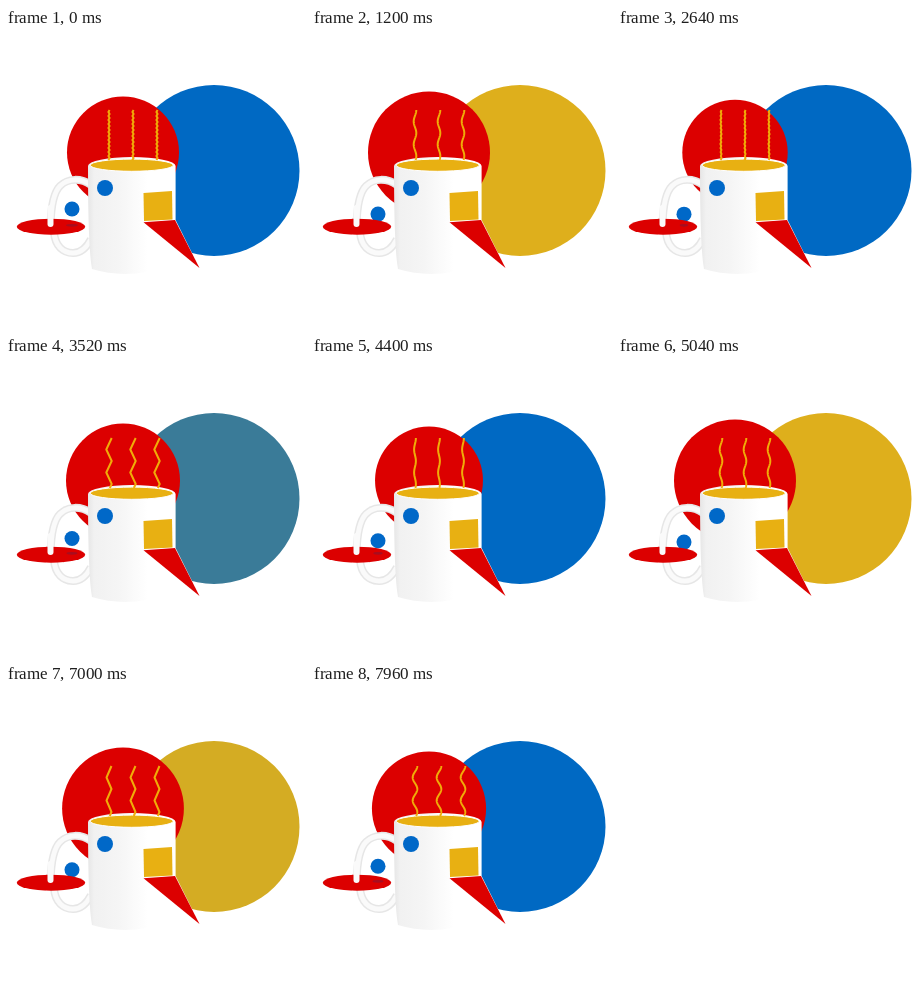
Animation, 300 px wide and 300 px high, one loop 8000 ms. Source, as an HTML page:

```html
<!DOCTYPE html>
<html lang="en">
<head>
<meta charset="utf-8">
<title>Steaming mug</title>
<style>
  html, body { margin: 0; width: 100%; height: 100%; overflow: hidden; background: #fff; }
  svg { display: block; width: 100vw; height: 100vh; }
</style>
</head>
<body>
<svg viewBox="0 0 300 300">
  <defs>
    <linearGradient id="glaze" gradientUnits="userSpaceOnUse" x1="82" x2="142">
      <stop offset="0" stop-color="#e6e6e6"/>
      <stop offset=".1" stop-color="#f1f1f1"/>
      <stop offset=".5" stop-color="#f5f5f5"/>
      <stop offset="1" stop-color="#fff"/>
    </linearGradient>
    <path id="tube" d="M85 157C75 150 62 150 54 158C47 165 45 180 44.500 197M48 204C49 218 57 225 67 225C75 225 81 219 85 211"/>
  </defs>

  <circle id="disc" cx="208" cy="142.5" r="85.5"/>
  <circle id="pulse" cx="117" cy="124.5" fill="#dc0000"/>

  <!-- handle, saucer and bouncing dot -->
  <g fill="none">
    <use href="#tube" stroke="#e6e6e6" stroke-width="8"/>
    <use href="#tube" stroke="#fafafa" stroke-width="5"/>
  </g>
  <circle id="dot" cx="66" r="7.5" fill="#0068c8"/>
  <ellipse cx="45" cy="198.7" rx="34.2" ry="8" fill="#dc0000"/>
  <ellipse id="shade" cx="66" cy="197.3" ry="1.4" fill="#8c1430" opacity=".65"/>
  <path d="M44.5 196V180" stroke="#fafafa" stroke-width="6" stroke-linecap="round"/>

  <!-- mug -->
  <path d="M82 138A43.800 9 0 0 1 169.600 138V192L193 239L141 205V244Q112 249 86 241Q82 220 82 138Z" fill="url(#glaze)"/>
  <ellipse cx="125.700" cy="137.200" rx="41.500" ry="6.100" fill="#e8b012" stroke="#fff"/>
  <circle cx="99" cy="160" r="8" fill="#0068c8"/>
  <path d="M137.500 165L166 163L166.500 191.500L138 193Z" fill="#e8b012"/>
  <path d="M137.500 194.300L169 192L193.500 240Z" fill="#dc0000"/>

  <g fill="none" stroke="#f0ac08" stroke-width="2" stroke-linejoin="round">
    <path class="steam"/>
    <path class="steam" transform="translate(24)"/>
    <path class="steam" transform="translate(48)"/>
  </g>
</svg>
<script>
const LOOP = 8000, BEAT = 1920;
const BLUE = [0, 105, 195], YELLOW = [232, 178, 20];
const WAVE_LENGTH = 23;

// [time, value] pairs, eased between neighbours
const radiusKeys = [[0, 56], [280, 57.1], [720, 52.7], [1200, 61], [1600, 57], [1800, 55.9], [1920, 56]];
const tintKeys = [[0, 0], [880, 0], [1100, 1], [1850, 0], [1920, 0]];
const steamKeys = [[0, 0], [280, 2.3], [720, 0.3], [1200, 1.3], [1600, 1.5], [1920, 0],
                   [2200, 8], [2640, 0.2], [3200, 2.5], [3520, 2.7], [3840, 0]];

const $ = id => document.getElementById(id);
const steams = document.querySelectorAll('.steam');

function ease(keys, t) {
  const i = Math.max(1, keys.findIndex(key => key[0] >= t));
  const [t0, a] = keys[i - 1], [t1, b] = keys[i];
  return a + (b - a) * (1 - Math.cos(Math.PI * (t - t0) / (t1 - t0))) / 2;
}

const triangle = angle => 1 - Math.acos(Math.cos(angle)) * 2 / Math.PI;

// Smooth waves on one beat, zigzags on the next; a fine ripple shows when they are flat
function steamPath(t) {
  const amplitude = ease(steamKeys, t);
  const wave = t < BEAT ? Math.cos : triangle;
  const ripple = Math.max(0, 0.6 - amplitude);
  const points = [];
  for (let y = 0; y <= 50; y += 0.5) {
    const x = 103 + amplitude * wave(2 * Math.PI * y / WAVE_LENGTH) + ripple * triangle(Math.PI * y / 2);
    points.push(x.toFixed(2) + ' ' + (82 + y));
  }
  return 'M' + points.join('L');
}

function draw(now) {
  const t = now % LOOP % (2 * BEAT);
  const beat = t % BEAT;
  const swing = Math.cos(2 * Math.PI * beat / BEAT);
  const tint = ease(tintKeys, beat);

  $('disc').setAttribute('fill', `rgb(${BLUE.map((c, i) => Math.round(c + (YELLOW[i] - c) * tint))})`);
  $('pulse').setAttribute('r', ease(radiusKeys, beat));
  $('dot').setAttribute('cy', 184 - 3 * swing);
  $('shade').setAttribute('rx', beat > 900 && beat < 1400 ? 0 : 5 + swing);
  const path = steamPath(t);
  steams.forEach(line => line.setAttribute('d', path));
}

const start = performance.now();
function tick() {
  draw(performance.now() - start);
  requestAnimationFrame(tick);
}
tick();
</script>
</body>
</html>
```
